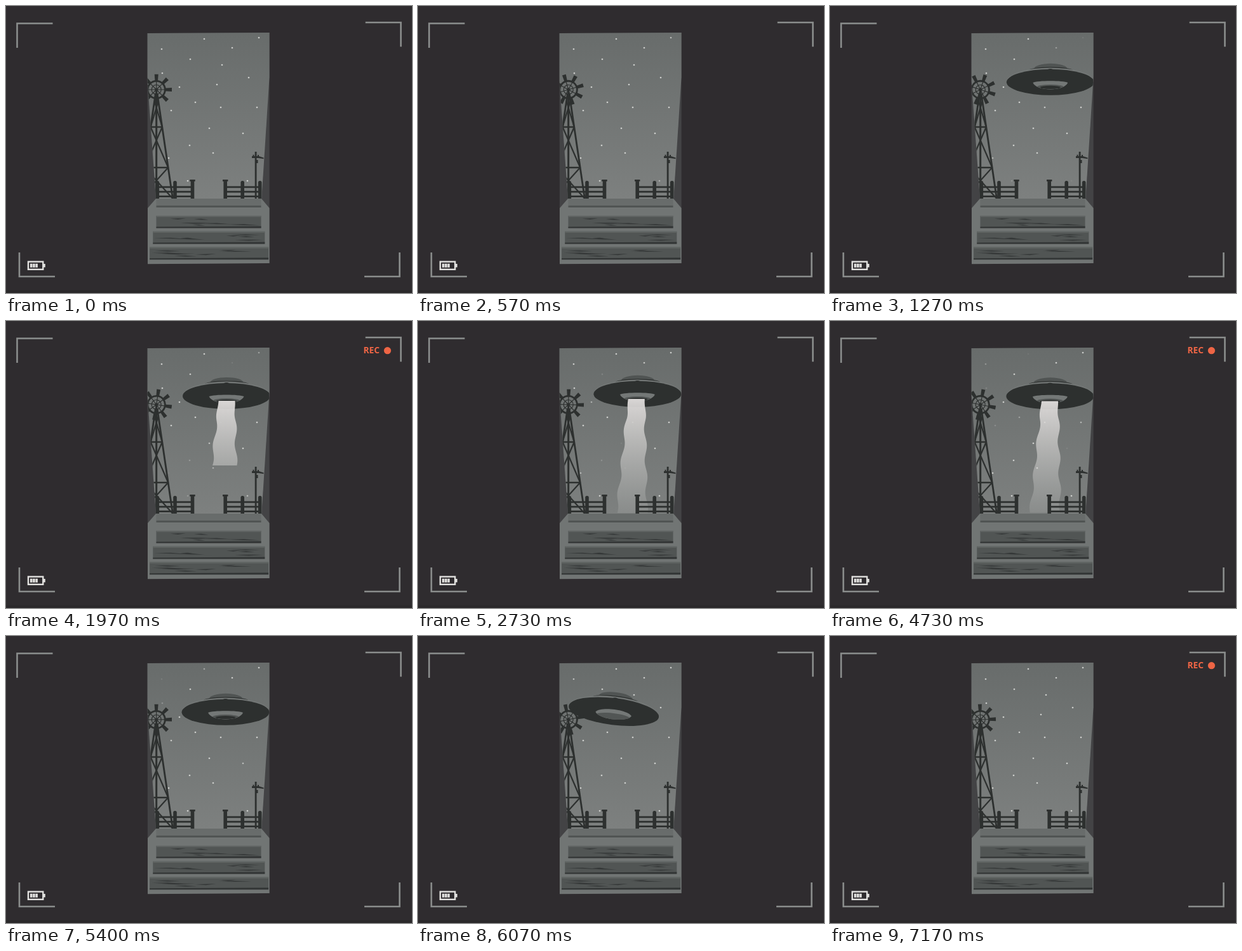
An HTML page with a canvas for the animation above (7210 ms loop, 639 by 453 pixels).

```html
<!DOCTYPE html>
<html lang="en">
<head>
<meta charset="utf-8">
<title>Night visitor</title>
<style>
  html, body { margin: 0; width: 100%; height: 100%; overflow: hidden; background: #2f2c2f; }
  canvas { display: block; width: 639px; height: 453px; }
</style>
</head>
<body>
<canvas id="stage" width="639" height="453"></canvas>
<script>
const ctx = document.getElementById('stage').getContext('2d');
const LOOP = 7210, BLINK = LOOP / 6, TAU = 2 * Math.PI;
const LEFT = 222.6, RIGHT = 414.6, GROUND = 304;
const BG = '#2f2c2f', INK = '#2d302f', FRAME = '#8b8e8d', PALE = '#e2e1df', ORANGE = '#ee6545';

const clamp = v => Math.max(0, Math.min(1, v));
const mix = (a, b, k) => a + (b - a) * k;
const smooth = v => { v = clamp(v); return v * v * (3 - 2 * v); };

function seeded(seed) {
  return () => (seed = (seed * 16807) % 2147483647) / 2147483647;
}
function trace(pts) {
  ctx.beginPath();
  for (let i = 0; i < pts.length; i += 2) ctx.lineTo(pts[i], pts[i + 1]);
}
function poly(fill, ...pts) {
  trace(pts);
  ctx.fillStyle = fill;
  ctx.fill();
}
function line(color, width, ...pts) {
  trace(pts);
  ctx.strokeStyle = color;
  ctx.lineWidth = width;
  ctx.stroke();
}
function box(fill, x, y, w, h) {
  ctx.fillStyle = fill;
  ctx.fillRect(x, y, w, h);
}
function oval(fill, x, y, rx, ry = rx) {
  ctx.beginPath();
  ctx.ellipse(x, y, rx, ry, 0, 0, TAU);
  ctx.fillStyle = fill;
  ctx.fill();
}
function ring(r, width) {
  ctx.beginPath();
  ctx.arc(0, 0, r, 0, TAU);
  ctx.strokeStyle = INK;
  ctx.lineWidth = width;
  ctx.stroke();
}
function fade(y0, y1, c0, c1) {
  const g = ctx.createLinearGradient(0, y0, 0, y1);
  g.addColorStop(0, c0);
  g.addColorStop(1, c1);
  return g;
}

// In the order in which they dim
const stars = [
  [380, 276], [398, 50], [286, 276], [356, 66], [256, 240], [338, 160], [289, 220],
  [326, 232], [320, 193], [290, 84], [332, 124], [273, 128], [340, 93], [382, 113],
  [395, 160], [298, 152], [260, 165], [373, 201], [312, 52], [246, 106], [245, 68]
];
function drawStars(t) {
  stars.forEach(([x, y], i) => {
    const dim = 1 - smooth(Math.abs(t - 1200 - i * 200) / 1150);
    ctx.globalAlpha = 0.85 - 0.78 * dim;
    oval('#dcdddb', x, y, 1.35);
  });
  ctx.globalAlpha = 1;
}

// Glides in from the right, hovers, tips over and leaves to the left
function saucer(t) {
  const enter = Math.pow(1 - clamp((t - 560) / 740), 3);
  const leave = Math.max(0, (t - 5650) / 420);
  const sway = -Math.cos((t - 2730) / 2500 * TAU) * smooth((t - 1270) / 1400);
  return {
    x: 346.8 + 1.4 * sway + 200 * enter - 39 * leave ** 2.2,
    y: 116 - 3 * Math.cos((t - 3300) / 4300 * TAU) - 10 * enter,
    tilt: 7 * Math.min(leave, 1.6) - 10 * enter,
    scale: 1 + 0.035 * Math.min(leave, 1.6),
    beam: 347 + 3.2 * sway
  };
}

function drawSaucer({ x, y, tilt, scale }) {
  const lean = clamp(Math.abs(tilt) / 7);
  ctx.save();
  ctx.translate(x, y);
  ctx.rotate(tilt * Math.PI / 180);
  ctx.scale(scale, scale);
  oval('#505453', 0.5, -20, 26, 8.2);
  oval(INK, 0.5, -16.5, 36, 6.2);
  oval('#737776', 0, 0.2, 68.8, 21.7);
  oval(INK, 0, 1.3, 69, 20.5);
  oval(INK, 0, -17, 4.5, 3);
  const side = mix(2, 5, lean), top = mix(-1.5, -4, lean);
  ctx.beginPath();
  ctx.moveTo(-27.5, side);
  ctx.bezierCurveTo(-20, top, 20, top, 27.5, side);
  ctx.bezierCurveTo(22, 16, -22, 16, -27.5, side);
  ctx.fillStyle = '#747877';
  ctx.fill();
  ctx.clip();
  oval('#525655', 0, 9, mix(21, 26, lean), mix(4, 5, lean));
  ctx.globalAlpha = 1 - lean;
  oval(INK, 0, 9.5, 16, 2.6);
  ctx.restore();
}

function drawBeam(t, { y, beam }) {
  const grow = smooth((t - 1650) / 580), shrink = smooth((t - 4800) / 620);
  if (!grow || shrink === 1) return;
  const top = y + 9, end = mix(mix(top, GROUND, grow), top, shrink);
  const edge = (side, yy) => {
    const k = (yy - top) / 181;
    const wave = 2 * Math.cos((yy - 46 - 0.035 * (t - 2730)) / 50 * TAU);
    return beam + side * 13 + (side < 0 ? -18.5 : 3.5) * k + wave * clamp(k * 6);
  };
  const pts = [];
  for (let yy = top; yy <= end; yy += 2) {
    pts.push(edge(1, yy), yy);
    pts.unshift(edge(-1, yy), yy);
  }
  poly(fade(top, GROUND, 'rgba(220,217,216,.98)', 'rgba(205,206,204,.15)'), ...pts);

  const rise = (t - 3580) / 1020;
  if (rise > 0 && rise < 1) drawCow(beam - 4, mix(GROUND - 1, top, rise * rise), 1 - 0.6 * smooth(rise * 2 - 1));
}
function drawCow(x, y, scale) {
  ctx.save();
  ctx.translate(x, y);
  ctx.scale(scale, scale);
  oval(INK, 1, 0, 6, 3);
  poly(INK, -3, -2, -9, -3, -7, 0, -9, 2, -4, 2);
  ctx.restore();
}

function drawWindmill(t) {
  const x = 236.7;
  const reach = y => (y - 136) * 0.147 + 1;
  line(INK, 3, x, 132, x, GROUND);
  for (const side of [-1, 1]) {
    line(INK, 2.8, x + side * reach(138), 138, x + side * reach(GROUND), GROUND);
    for (const [y0, y1] of [[150, 191], [191, 255], [255, GROUND]])
      line(INK, 2.2, x - side * reach(y0), y0, x + side * reach(y1), y1);
  }
  for (const y of [191, 255]) line(INK, 2.5, x - reach(y), y, x + reach(y), y);

  ctx.save();
  ctx.translate(x, 132);
  ctx.rotate(t / LOOP * TAU);
  ring(13.7, 2.8);
  ring(7.5, 1.2);
  for (let i = 0; i < 8; i++) {
    line(INK, 1.2, 0, 0, 0, -14);
    poly(INK, -2.2, -13, 2.2, -13, 3, -24.3, -3, -24.3);
    ctx.rotate(TAU / 8);
  }
  oval(INK, 0, 0, 2.6);
  ctx.restore();
}

function post(x) {
  ctx.beginPath();
  ctx.roundRect(x - 2.8, 276, 5.6, 28, [2.5, 2.5, 0, 0]);
  ctx.fillStyle = INK;
  ctx.fill();
}
function gate(x) {
  box(INK, x - 2.8, 275, 5.6, 29);
  box(INK, x - 4.2, 274, 8.4, 2.8);
}
function drawFence() {
  for (let i = 0; i < 3; i++) {
    box(INK, 236, 284.4 + i * 7.4, 56, 2.8);
    box(INK, 347, 284.4 + i * 7.4, 55, 2.8);
  }
  [238.3, 266, 372.2, 399.7].forEach(post);
  [293.5, 345.2].forEach(gate);
}
function drawPole() {
  box(INK, 391.7, 230, 2.8, 74);
  poly(INK, 387, 237, 398, 237, 405.5, 239.5, 405.5, 241.3, 397, 240, 387, 240);
  box(INK, 388.5, 234.8, 2, 3);
  box(INK, 396, 235, 2, 3);
  box(INK, 393, 243, 3.5, 5);
}

function plank(x, y, w, h, rand) {
  box('#515554', x, y, w, h);
  box('#606463', x, y, w, 2);
  poly('#323535', x, y + h - 2, x + w, y + h - 3, x + w, y + h, x, y + h);
  for (let i = 0; i < 7; i++) {
    const len = mix(20, 55, rand()), gx = x + rand() * (w - len), gy = y + mix(3, h - 5, rand());
    poly('#343737', gx, gy, gx + len / 2, gy - 0.4, gx + len, gy + mix(-1, 2, rand()), gx + len / 2, gy + 1.2);
  }
}
function drawSteps() {
  const rand = seeded(41);
  poly('#717574', 236, GROUND, 402, GROUND, RIGHT, 319, RIGHT, 406, 223, 407.2, 223, 319);
  box('#686c6b', 236.5, GROUND, 165, 11);
  box('#505453', 236.5, 315, 165, 3);
  for (let i = 0; i < 3; i++) plank(236.5 - i * 5.2, 331 + i * 24.8, 165 + i * 11, 19.6, rand);
}

function drawDoor(t) {
  poly('#434345', LEFT, 43, RIGHT, 42, RIGHT, 406, 223, 407);
  ctx.save();
  trace([LEFT, 43, RIGHT, 42, RIGHT, 112, 402.3, GROUND, 236, GROUND, LEFT, 118]);
  ctx.clip();
  box(fade(42, GROUND, '#686c6b', '#7d807f'), LEFT - 1, 42, 194, 262);
  const ship = saucer(t);
  drawStars(t);
  drawSaucer(ship);
  drawBeam(t, ship);
  drawWindmill(t);
  drawFence();
  drawPole();
  ctx.restore();
  drawSteps();
}

function drawBattery() {
  ctx.strokeStyle = PALE;
  ctx.lineWidth = 2.4;
  ctx.strokeRect(35, 403.6, 23.3, 12.2);
  box(PALE, 59, 407, 2.8, 5.4);
  for (let i = 0; i < 3; i++) box(PALE, 38 + i * 4.2, 406.7, 3.5, 6);
}
function drawRec() {
  const setFont = size => { ctx.font = `extra-condensed 700 ${size}px "Noto Sans", Roboto, sans-serif`; };
  setFont(17.3);
  const size = 17.3 * Math.min(1, 25.5 / ctx.measureText('REC').width);
  setFont(size);
  ctx.fillStyle = ORANGE;
  ctx.textBaseline = 'alphabetic';
  ctx.fillText('REC', 562.5, 45.8 + size * 0.357);
  oval(ORANGE, 600.4, 46.7, 5.6);
}
function drawViewfinder(t) {
  line(FRAME, 2.6, 17.5, 66, 17.5, 27.5, 73.5, 27.5);
  line(FRAME, 2.6, 565.7, 26, 621.5, 26, 621.5, 64.3);
  line(FRAME, 2.6, 21, 389, 21, 427, 77, 427);
  line(FRAME, 2.6, 564, 427, 619.5, 427, 619.5, 389);
  drawBattery();
  if (t % BLINK >= BLINK / 2) drawRec();
}

function frame(now) {
  const t = now % LOOP;
  box(BG, 0, 0, 639, 453);
  box('#2a282a', 0, 449, 639, 4);
  drawDoor(t);
  drawViewfinder(t);
  requestAnimationFrame(frame);
}
requestAnimationFrame(frame);
</script>
</body>
</html>
```
